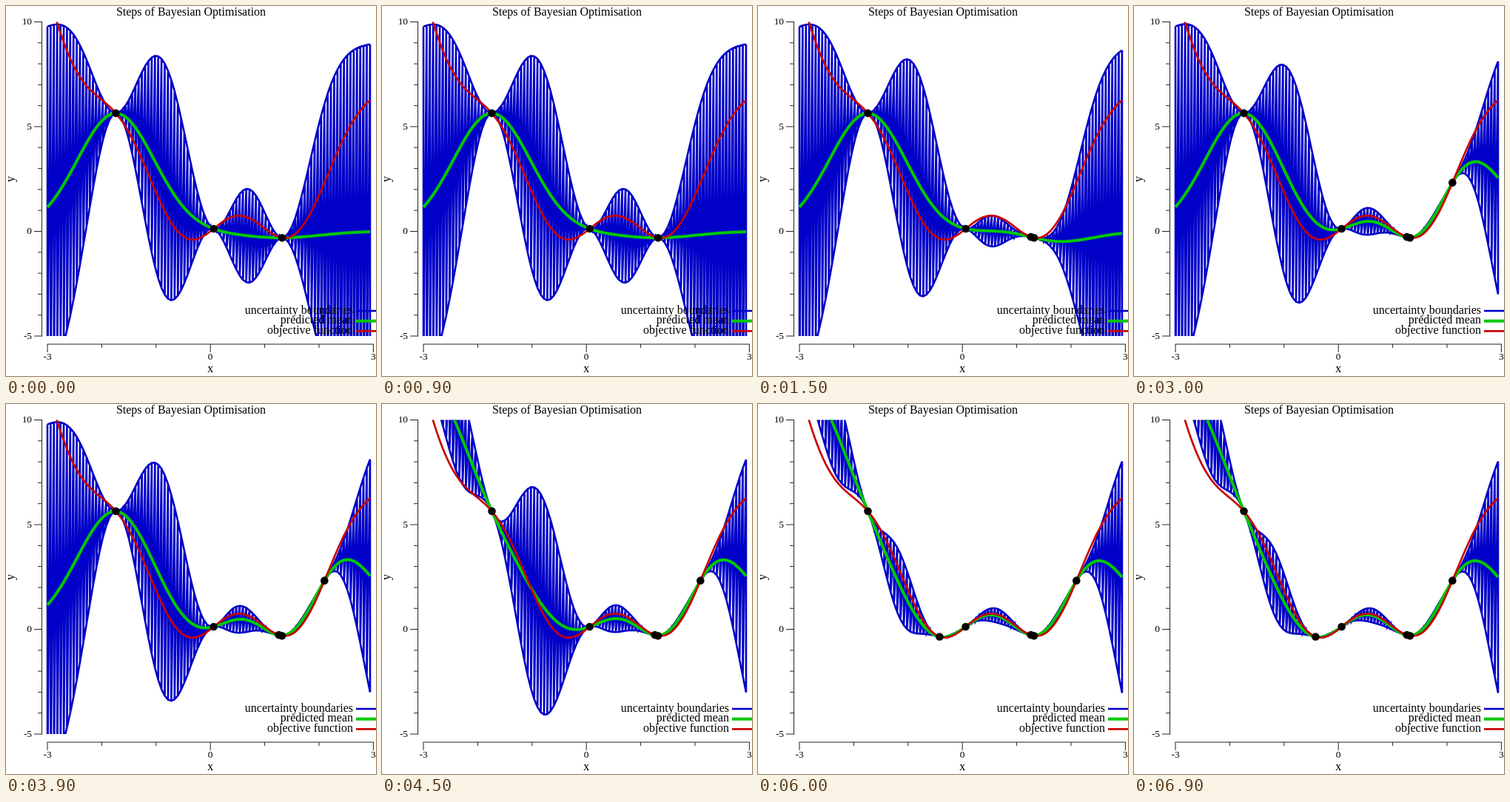
These frames come from a looping animation (500 px wide and 500 px high, 7.5 s). An HTML page:

```html
<!DOCTYPE html>
<html lang="en">
<head>
<meta charset="utf-8">
<title>Steps of Bayesian Optimisation</title>
<style>
  html, body { margin: 0; width: 100%; height: 100%; overflow: hidden; background: #fff; }
  svg { display: block; width: 500px; height: 500px; }
  text { font: 16px "Liberation Serif", "Times New Roman", serif; fill: #000; }
  .tick { font-size: 13.3px; }
  path, line { fill: none; }
  .axis { stroke: #222; stroke-width: 1; }
  .band { stroke: #0000c8; stroke-width: 2.6; }
  .mean { stroke: #00c800; stroke-width: 4; }
  .goal { stroke: #c80000; stroke-width: 2.7; }
</style>
</head>
<body>
<svg viewBox="0 0 500 500">
  <clipPath id="plot"><rect x="50" y="21.5" width="450" height="424.5"/></clipPath>
  <g id="axes"></g>
  <g id="curves"></g>
  <g id="dots"></g>
</svg>
<script>
const STEP_MS = 1500;
const JITTER = 2.5e-4;
const SCALE = 9;
const GRID = Array.from({ length: 100 }, (_, i) => -3 + 0.06 * i);

// Samples in the order they are taken; the first three are known at the start.
const SAMPLES = [-1.74, 0.06, 1.32, 1.26, 2.1, -3, -0.42];
const COUNTS = [3, 4, 5, 6, 7];

const objective = x => Math.sin(3 * x) + x * x - x;
const kernel = (a, b) => Math.exp(-((a - b) ** 2));
const dot = (a, b) => a.reduce((sum, v, i) => sum + v * b[i], 0);
const px = x => 56 + 73.4 * (x + 3);
const py = y => 304.5 - 28.3 * y;

function add(parent, tag, attrs, content = "") {
  const node = document.createElementNS("http://www.w3.org/2000/svg", tag);
  for (const key in attrs) node.setAttribute(key, attrs[key]);
  node.textContent = content;
  return parent.appendChild(node);
}

const label = (parent, x, y, content, anchor = "middle", cls = "") =>
  add(parent, "text", { x, y, "text-anchor": anchor, class: cls }, content);

const trace = points =>
  "M" + points.map(([x, y]) => px(x).toFixed(2) + " " + py(y).toFixed(2)).join("L");

// Gauss-Jordan inverse of a small positive definite matrix
function invert(matrix) {
  const n = matrix.length;
  const rows = matrix.map((row, i) => [...row, ...row.map((_, j) => +(i === j))]);
  for (let c = 0; c < n; c++) {
    const pivot = rows[c][c];
    rows[c] = rows[c].map(v => v / pivot);
    for (let r = 0; r < n; r++) {
      if (r === c) continue;
      const factor = rows[r][c];
      rows[r] = rows[r].map((v, j) => v - factor * rows[c][j]);
    }
  }
  return rows.map(row => row.slice(n));
}

// Gaussian process posterior on the grid
function posterior(xs) {
  const inverse = invert(xs.map((a, i) => xs.map((b, j) => kernel(a, b) + (i === j ? JITTER : 0))));
  const ys = xs.map(objective);
  return GRID.map(x => {
    const k = xs.map(a => kernel(x, a));
    const weights = inverse.map(row => dot(row, k));
    const mean = dot(weights, ys);
    const spread = SCALE * Math.max(0, 1 - dot(weights, k));
    return { x, mean, top: mean + spread, bottom: mean - spread };
  });
}

function makeStep(count) {
  const xs = SAMPLES.slice(0, count);
  const fit = posterior(xs);
  const tops = fit.map(p => [p.x, p.top]);
  const bottoms = fit.map(p => [p.x, p.bottom]);
  const zigzag = tops.flatMap((top, i) => [top, bottoms[i]]);
  return {
    band: trace(zigzag) + trace(tops) + trace(bottoms),
    mean: trace(fit.map(p => [p.x, p.mean])),
    dots: xs.filter(x => objective(x) <= 10)
  };
}

function drawAxes(g) {
  const line = (x1, y1, x2, y2) => add(g, "line", { x1, y1, x2, y2, class: "axis" });
  line(48.5, 21, 48.5, 446.5);
  for (let y = -5; y <= 10; y++) {
    const major = y % 5 === 0;
    line(major ? 38 : 43, py(y), 49, py(y));
    if (major) label(g, 35, py(y) + 3.5, y, "end", "tick");
  }
  line(55.5, 457, 497, 457);
  for (let x = -3; x <= 3; x++) {
    const major = x % 3 === 0;
    line(px(x), 457, px(x), major ? 468 : 462);
    if (major) label(g, px(x), 478, x, "middle", "tick");
  }
  label(g, 250, 13, "Steps of Bayesian Optimisation");
  label(g, px(0), 495, "x");
  label(g, 0, 0, "y").setAttribute("transform", "translate(11 234) rotate(-90)");
}

function addCurve(cls, name, textY, lineY) {
  const g = document.getElementById("curves");
  const path = add(g, "path", { class: cls, "clip-path": "url(#plot)" });
  label(g, 469, textY, name, "end");
  add(g, "line", { x1: 473, y1: lineY, x2: 500, y2: lineY, class: cls });
  return path;
}

drawAxes(document.getElementById("axes"));
const band = addCurve("band", "uncertainty boundaries", 416, 412);
const mean = addCurve("mean", "predicted mean", 429, 425.7);
const goal = addCurve("goal", "objective function", 443, 439.3);
goal.setAttribute("d", trace(GRID.map(x => [x, objective(x)])));

const steps = COUNTS.map(makeStep);
const dots = document.getElementById("dots");
let shown = -1;

function show(index) {
  if (index === shown) return;
  shown = index;
  const step = steps[index];
  band.setAttribute("d", step.band);
  mean.setAttribute("d", step.mean);
  dots.replaceChildren();
  for (const x of step.dots) add(dots, "circle", { cx: px(x), cy: py(objective(x)), r: 5.3 });
}

function tick() {
  show(Math.floor(performance.now() / STEP_MS) % steps.length);
  requestAnimationFrame(tick);
}
tick();
</script>
</body>
</html>
```
